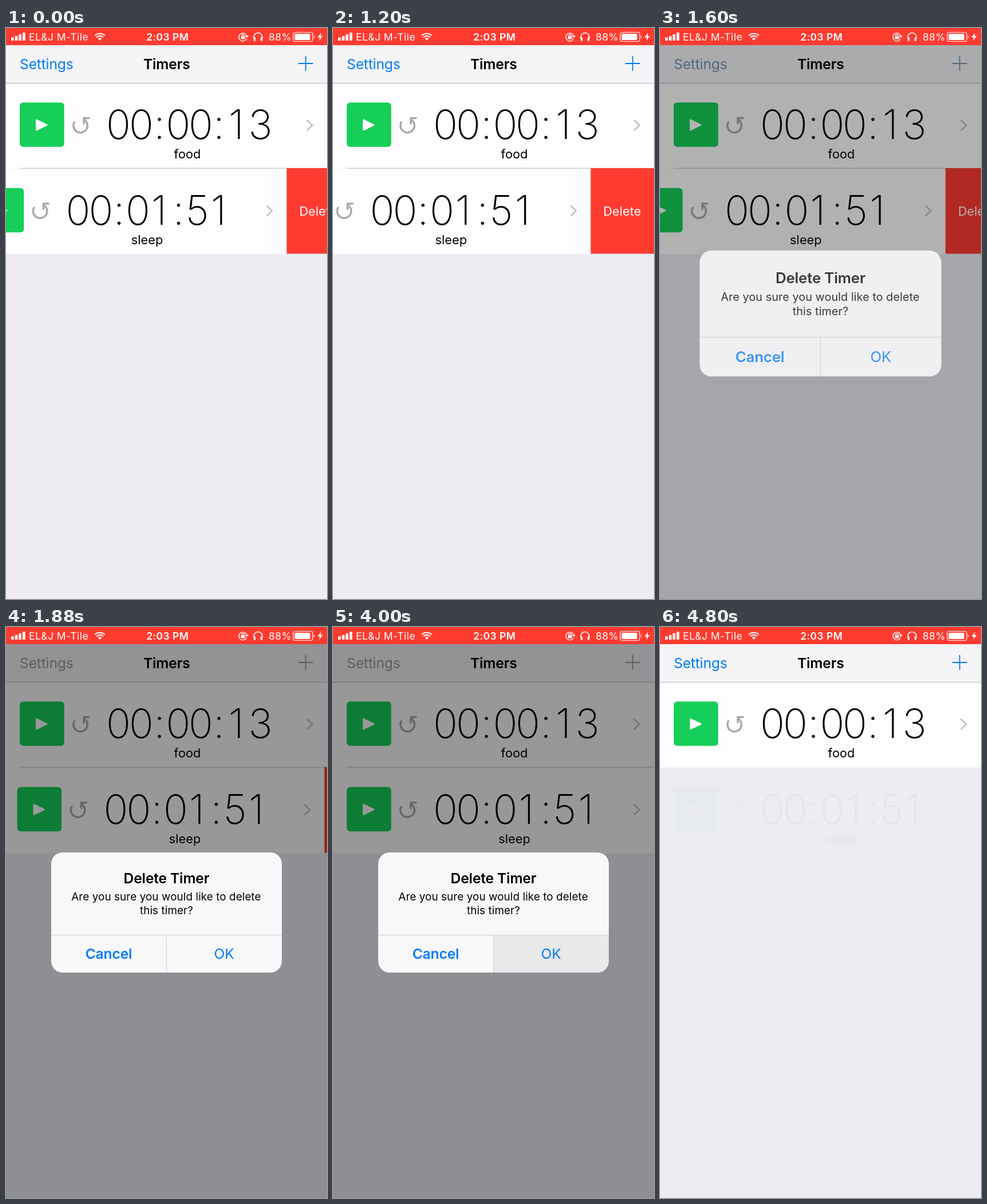
Write an HTML page that moves like this. It is 561 by 998 pixels and loops after 4840 ms.

```html
<!DOCTYPE html>
<html lang="en">
<head>
<meta charset="utf-8">
<title>Timers</title>
<style>
  html, body { margin: 0; width: 100%; height: 100%; overflow: hidden; background: #eeecf2; }
  svg { display: block; width: 561px; height: 998px; font-family: Inter, Roboto, "Liberation Sans", sans-serif; font-optical-sizing: none; }
  text { white-space: pre; }
  .mid { text-anchor: middle; }
  .nav { font-size: 24.6px; letter-spacing: -.15px; }
  .bold { font-weight: 600; }
  .msg { font-size: 18.9px; letter-spacing: .07px; }
  .label { font-size: 21.8px; }
  .digits { font-size: 71px; font-weight: 200; }
  .status { font-size: 17.5px; letter-spacing: .45px; fill: #fff; }
  .line { fill: none; stroke-linecap: round; stroke-linejoin: round; }
</style>
</head>
<body>
<svg viewBox="0 0 561 998">
  <rect width="561" height="998" fill="#eeecf2"/>
  <g id="food"></g>
  <g id="sleep">
    <rect x="0" y="244.5" width="24" height="1.2" fill="#fefdff"/>
    <rect x="24" y="244.5" width="537" height="1.2" fill="#c8c7cc"/>
    <g id="slide">
      <g id="sleepRow"></g>
      <rect x="561" y="245" width="150" height="149.5" fill="#ff3b30"/>
      <text class="label" x="583" y="328" fill="#fff">Delete</text>
    </g>
  </g>

  <rect y="30" width="561" height="66" fill="#f5f4f7"/>
  <rect y="96" width="561" height="1" fill="#b4b3b7"/>
  <g id="tint">
    <text class="nav" x="24" y="72">Settings</text>
    <path d="M510.7 61.1h26v1.8h-26zM522.8 49h1.8v26h-1.8z"/>
  </g>
  <text class="nav bold mid" x="280.8" y="72">Timers</text>

  <rect id="dim" y="30" width="561" height="968"/>

  <g id="alert">
    <g id="panel">
      <rect x="79" y="394" width="403" height="210" rx="20" fill="#f8f7fa"/>
      <path id="pressed" d="M281 538h201v46a20 20 0 0 1-20 20h-181z" fill="#e9e8ea"/>
      <path d="M79 538.5h403M280.5 538v66" stroke="#d2d1d5"/>
    </g>
    <g id="words">
      <text class="nav bold mid" x="280.5" y="448">Delete Timer</text>
      <text class="msg mid" x="280" y="478">Are you sure you would like to delete</text>
      <text class="msg mid" x="280.5" y="502">this timer?</text>
      <g fill="#007aff">
        <text class="nav bold mid" x="179.5" y="580">Cancel</text>
        <text class="nav mid" x="381" y="580">OK</text>
      </g>
    </g>
  </g>

  <rect width="561" height="30" fill="#ff3b30"/>
  <g fill="#fff">
    <path d="M9 16.5h4.6v5.5h-4.6zM15.7 14h4.6v8h-4.6zM22.3 11h4.6v11h-4.6zM29 8h4.6v14h-4.6z"/>
    <path d="M160.7 18.4a5 5 0 0 1 6.6 0l-3.3 3.6z"/>
    <rect x="504.5" y="10" width="27" height="11" rx="1.5"/>
    <path d="M538 12.5q2.6 3 0 6z"/>
    <path d="M551 8l-6.5 8.5h4l-1.5 6 6.5-8.5h-4z"/>
    <rect x="410.6" y="14.5" width="7" height="5" rx=".6"/>
  </g>
  <g class="line" stroke="#fff">
    <path d="M155.2 13.2a13 13 0 0 1 17.6 0M158 16.2a9 9 0 0 1 12 0" stroke-width="2.2" stroke-linecap="butt"/>
    <rect x="502" y="7.5" width="34" height="16" rx="3.5" stroke-width="1.2"/>
    <path d="M420 19.5a7 7 0 1 1 1-4M418.8 14l2.2 2.4 1.8-2.6M412.2 14.5v-1.5a1.9 1.9 0 0 1 3.8 0v1.5" stroke-width="1.4"/>
    <path d="M433 18v-2a7.5 7.5 0 0 1 15 0v2" stroke-width="1.6"/>
    <path d="M434.5 17.5v4M446.5 17.5v4" stroke-width="3.2"/>
  </g>
  <text class="status" x="40" y="22">EL&amp;J M-Tile</text>
  <text class="status bold mid" x="282.3" y="22">2:03 PM</text>
  <text class="status" x="459" y="22">88%</text>
</svg>
<script>
const LOOP = 4840, STEP = 40;
const CELLS = [196.5, 236.5, 268, 301, 340.5, 372, 405, 444.5];
const el = id => document.getElementById(id);

function row(time, label) {
  // A one sits a little left in its cell.
  const xs = CELLS.map((x, i) => time[i] === '1' ? x - 2.5 : x);
  return `<rect y="97" width="561" height="148.5" fill="#fefdff"/>
    <rect x="24" y="130.2" width="77.7" height="77.6" rx="6" fill="#15cf58"/>
    <path d="M53 160.5L71.5 169.5L53 178.5z" fill="#fff" stroke="#fff" stroke-width="2" stroke-linejoin="round"/>
    <g class="line" stroke="#a9a8ac" stroke-width="3.4">
      <path d="M119.4 164.5A12.3 12.3 0 1 0 138 161"/>
      <path d="M145 157.5H136V167" stroke-linejoin="miter"/>
    </g>
    <text class="digits mid" x="${xs.join(' ')}" y="194">${time}</text>
    <text class="label mid" x="317" y="228">${label}</text>
    <path class="line" d="M526.5 161.5L535.5 170L526.5 178.5" stroke="#c2c1c6" stroke-width="2.6"/>`;
}
el('food').innerHTML = row('00:00:13', 'food');
el('sleepRow').innerHTML = row('00:01:51', 'sleep');
el('sleepRow').setAttribute('transform', 'translate(0 149.5)');

// Share of the way still to go for a critically damped spring.
function rest(ms, rate) {
  const x = Math.max(0, ms) / 1000 * rate;
  return (1 + x) * Math.exp(-x);
}
const smooth = u => { u = Math.min(1, Math.max(0, u)); return u * u * (3 - 2 * u); };
const mix = (a, b, k) => a.map((v, i) => Math.round(v + (b[i] - v) * k));

function draw(t) {
  const opening = 1 - rest(t - 1480, 22.8);
  const shown = t < 4080 ? opening : rest(t - 4080, 22.8);
  const swipe = (111.5 - 41 * rest(t, 4.8)) * rest(t - 1480, 12.5);
  const scale = 1.2 - 0.2 * opening;

  el('slide').setAttribute('transform', `translate(${-swipe.toFixed(2)} 0)`);
  el('sleep').setAttribute('opacity', 1 - smooth((t - 4520) / 310));
  el('dim').setAttribute('opacity', 0.4 * shown);
  el('tint').setAttribute('fill', `rgb(${mix([0, 122, 255], [154, 154, 159], shown)})`);
  el('panel').setAttribute('opacity', 1 - (1 - shown) ** 1.7);
  el('words').setAttribute('opacity', shown);
  el('alert').setAttribute('transform', `translate(280.5 499) scale(${scale}) translate(-280.5 -499)`);
  el('pressed').setAttribute('opacity', t >= 4000 && t < 4080 ? 1 : 0);
}

const start = performance.now();
function tick() {
  const t = (performance.now() - start) % LOOP;
  draw(Math.floor(t / STEP) * STEP);
  requestAnimationFrame(tick);
}
tick();
</script>
</body>
</html>
```
